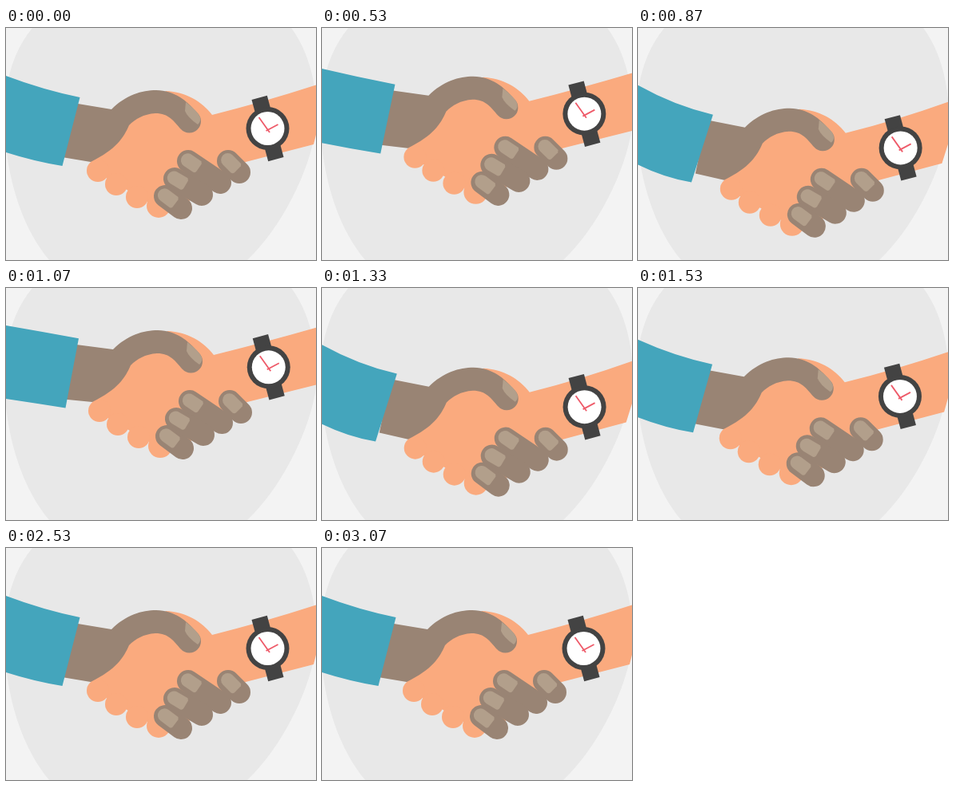
Animation, 388 px wide and 291 px high, one loop 3270 ms. Source, as an HTML page:

```html
<!DOCTYPE html>
<html lang="en">
<head>
<meta charset="utf-8">
<title>Handshake</title>
<style>
html, body { margin: 0; width: 100%; height: 100%; overflow: hidden; background: #f3f3f3; }
svg { display: block; width: 100vw; height: 100vh; }
.skin { fill: #faaa7e; }
.brown { fill: #998474; }
.nail { fill: #b29f8b; }
.finger { stroke: #998474; stroke-width: 28; stroke-linecap: round; }
</style>
</head>
<body>
<svg viewBox="0 0 388 291">
  <defs>
    <path id="nail" class="nail" d="M13-8.5H-2A8.5 8.5 0 0 0-2 8.5H12Q15 8 15 5V-6Z"/>
  </defs>
  <path fill="#e8e8e8" d="M33 0C12 25 0 60-2 100C-4 170 15 245 54 291H302C345 250 380 180 388 125C392 80 380 30 357 0Z"/>
  <g id="hands">
    <path id="arm" class="skin"/>
    <g class="skin">
      <circle cx="115" cy="179" r="14"/>
      <circle cx="138" cy="196" r="14"/>
      <circle cx="164" cy="212" r="14"/>
      <circle cx="191" cy="223" r="15"/>
    </g>
    <path id="wrist" class="brown"/>
    <path class="nail" d="M225 93Q240 104 243 112Q244 118 240 121Q227 112 224 104Z"/>
    <g id="fingers"></g>
    <g id="watch">
      <rect x="-10" y="-40" width="20" height="80" fill="#434343" transform="rotate(-15)"/>
      <circle r="27" fill="#434343"/>
      <circle r="21" fill="#fff"/>
      <path d="M2.5 5L-11-14M-2 3L13-5" fill="none" stroke="#ee5a69" stroke-width="1.8"/>
    </g>
  </g>
  <path id="sleeve" fill="#44a5bc"/>
</svg>
<script>
const LOOP = 3270, STEP = 1000 / 15;
const $ = id => document.getElementById(id);

// Turning points of the shake: time in ms, vertical offset
const keys = [[270, 0], [426, 11], [640, -45], [875, 23], [1143, -36], [1361, 24], [1670, -1], [2000, 0]];

// Each finger runs from knuckle to nail
const fingers = [[268, 194, 228, 167], [245, 209, 211, 189], [219, 226, 199, 211], [292, 181, 278, 167]];
$('fingers').innerHTML = fingers.map(([kx, ky, x, y]) => {
  const angle = Math.atan2(ky - y, kx - x) * 180 / Math.PI;
  return `<path class="finger" d="M${x} ${y}L${kx} ${ky}"/>
    <use href="#nail" transform="translate(${x + 1} ${y}) rotate(${angle})"/>`;
}).join('');

function offsetAt(t) {
  const i = keys.findIndex(k => k[0] > t);
  if (i < 1) return 0;
  const [t0, a] = keys[i - 1], [t1, b] = keys[i];
  return a + (b - a) * (1 - Math.cos(Math.PI * (t - t0) / (t1 - t0))) / 2;
}

function pose(d) {
  const draw = (id, path) => $(id).setAttribute('d', path);
  const move = (id, x, y) => $(id).setAttribute('transform', `translate(${x} ${y})`);
  move('hands', Math.abs(d) * .08, d);
  move('watch', 327.5 - Math.abs(d) * .03, 126 + .07 * d);

  draw('arm', `M106 168L154 120L190 90L200 79C225 80 245 92 258 109
    Q330 91 405 ${66 - .13 * d}L${385 - .28 * d} ${146 + .04 * d}
    L300 168L270 185L215 228L191 226L115 182Z`);

  draw('wrist', `M84 ${94 - .07 * d}L132 102C150 84 170 78 188 78C212 79 225 90 240 107
    A14.5 14.5 0 0 1 219 127C210 117 204 107 187 107C172 108 162 114 154 122
    C147 138 138 152 106 168L70 ${162 - .1 * d}Z`);

  const bend = 4 + .17 * d;
  const x1 = 92.5 + .06 * d, y1 = 87 + .95 * d;
  const x2 = 70.5 - .16 * d, y2 = 173 + .9 * d;
  const top = 60 + .52 * d, bottom = 156 + .68 * d;
  draw('sleeve', `M0 ${top}Q${x1 / 2} ${(top + y1) / 2 + bend} ${x1} ${y1}
    L${x2} ${y2}Q${x2 / 2} ${(bottom + y2) / 2 + bend * .7} 0 ${bottom}Z`);
}

function frame() {
  const t = performance.now() % LOOP;
  pose(offsetAt(Math.floor((t + 4) / STEP) * STEP));
  requestAnimationFrame(frame);
}
frame();
</script>
</body>
</html>
```
